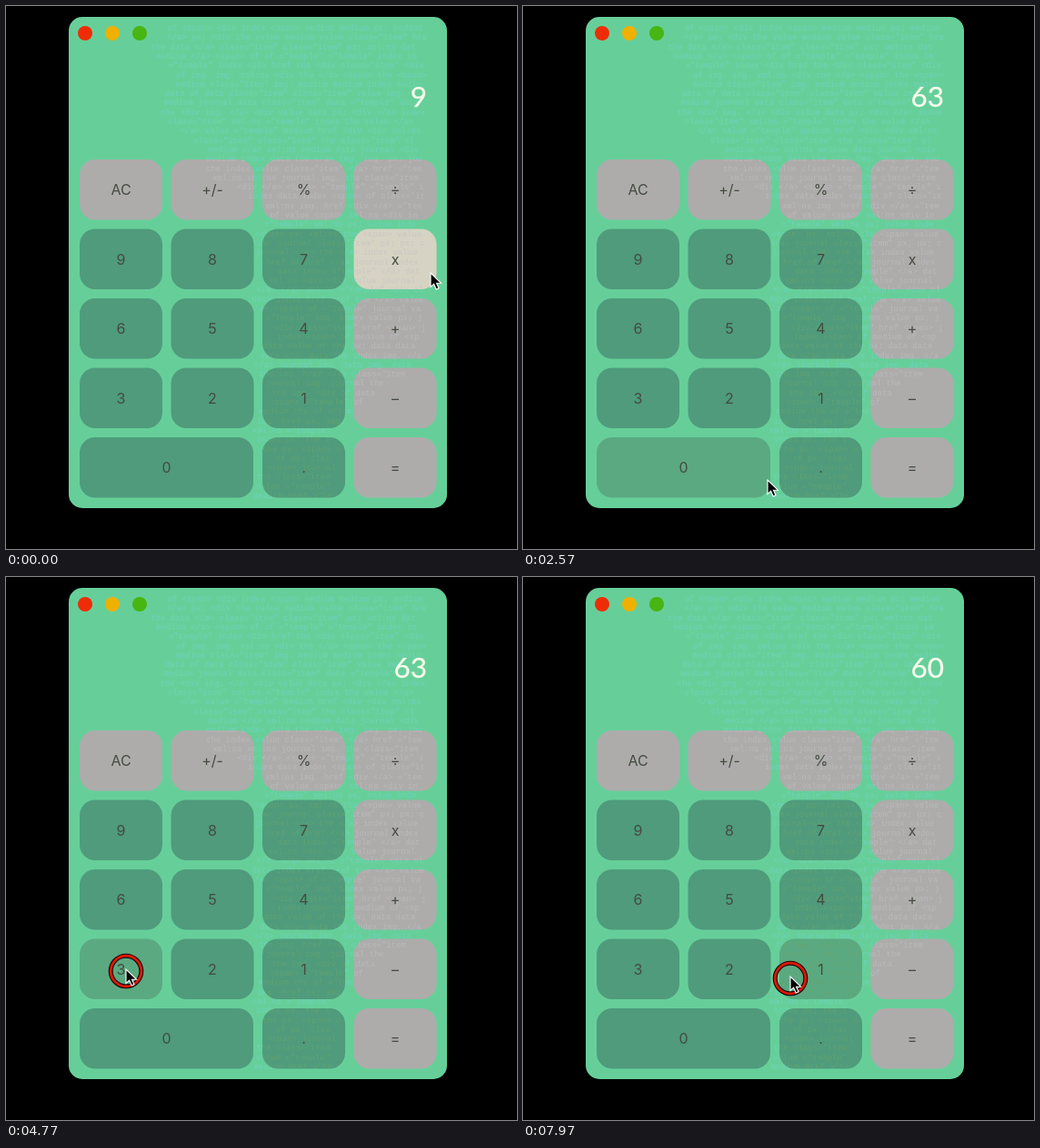
These frames come from a looping animation (562x598 px, 8 s). An HTML page:

```html
<!DOCTYPE html>
<html lang="en">
<head>
<meta charset="utf-8">
<title>Calculator</title>
<style>
  html, body { margin: 0; width: 100%; height: 100%; overflow: hidden; background: #000; }
  svg { display: block; width: 562px; height: 598px; }
  .label { font: 16px Inter, sans-serif; text-anchor: middle; fill: #444b3f; }
  .digit { fill: #4f9b7c; }
  .op { fill: #adacab; }
  .digit.hover { fill: #5ba981; }
  .op.hover { fill: #d6d3c4; }
  #display { font: 31.5px Lato, sans-serif; text-anchor: end; fill: #f8fcec; stroke: #f8fcec; stroke-width: .25; }
  #code { font: 9px "Liberation Mono", monospace; white-space: pre; }
</style>
</head>
<body>
<svg viewBox="0 0 562 598">
  <defs>
    <g id="code"></g>
    <clipPath id="opClip"></clipPath>
    <clipPath id="digitClip"></clipPath>
  </defs>
  <rect x="69" y="12" width="416" height="541" rx="15" fill="#66cf99"/>
  <use href="#code" fill="#70d3c4" opacity=".7"/>
  <circle cx="87" cy="30" r="8" fill="#ee2d08"/>
  <circle cx="117" cy="30" r="8" fill="#f0b000"/>
  <circle cx="147" cy="30" r="8" fill="#47b512"/>
  <text id="display" x="463" y="111"></text>
  <g id="keys"></g>
  <use href="#code" fill="#c2c1c4" opacity=".6" clip-path="url(#opClip)"/>
  <use href="#code" fill="#69a570" opacity=".65" clip-path="url(#digitClip)"/>
  <g id="labels"></g>
  <g id="pointer">
    <g id="ring" fill="none">
      <circle cy="2" r="16.8" stroke="#160a05" stroke-width="5"/>
      <circle cy="2" r="16.8" stroke="#df1705" stroke-width="2.8"/>
    </g>
    <path d="M0 0V15.5L3.6 12.2L6.2 18L9 16.8L6.5 11.2H11.5Z" stroke="#fff" stroke-width="1.1"/>
  </g>
</svg>
<script>
const $ = id => document.getElementById(id);
const smooth = (from, to, v) => {
  const u = Math.min(1, Math.max(0, (v - from) / (to - from)));
  return u * u * (3 - 2 * u);
};

function add(parent, tag, attrs, text = '') {
  const node = document.createElementNS('http://www.w3.org/2000/svg', tag);
  for (const name in attrs) node.setAttribute(name, attrs[name]);
  node.textContent = text;
  return parent.appendChild(node);
}

// Keypad
const keys = [];
const rows = ['AC +/- % ÷', '9 8 7 x', '6 5 4 +', '3 2 1 –', '0 _ . ='];
rows.forEach((row, r) => row.split(' ').forEach((label, c) => {
  if (label === '_') return;
  const box = {
    x: 81 + c * 100.5, y: 169 + r * 76.5,
    width: label === '0' ? 191 : 91, height: 66.5, rx: 17
  };
  const kind = r === 0 || c === 3 ? 'op' : 'digit';
  keys.push({ ...box, node: add($('keys'), 'rect', { ...box, class: kind }) });
  add($(kind + 'Clip'), 'rect', box);
  add($('labels'), 'text', { class: 'label', x: box.x + box.width / 2, y: box.y + 39 }, label);
}));

// Faint code texture, wide at the top and narrowing downwards
let seed = 17;
const random = () => (seed = seed * 16807 % 2147483647) / 2147483647;
const words = '<div class="item" value ="temple" img. journal the xml:ns medium </a> href index <span> of px; data'.split(' ');
for (let y = 27; y < 552; y += 10.3) {
  const left = 170 + 105 * smooth(105, 250, y) + 12 * Math.sin(y / 11) + random() * 12;
  const right = 465 - 95 * smooth(380, 480, y) - random() * 12;
  const count = Math.floor((right - left) / 5.4);
  let line = '';
  while (line.length < count) line += words[Math.floor(random() * words.length)] + ' ';
  add($('code'), 'text', { x: left, y }, line.slice(0, count));
}

// Pointer stops: arrival in ms, place, and the key pressed there
const stops = [
  [0, 467, 294], [300, 430, 287, 'x'], [850, 330, 287, '7'], [1530, 431, 513, '='],
  [2570, 269, 522], [3400, 428, 434, '–'], [4170, 345, 318], [4700, 132, 432, '3'],
  [5250, 445, 511, '='], [6970, 418, 276, 'x'], [7850, 294, 440, '1']
].map(([at, x, y, key]) => ({ at, x, y, key }));
const pressDelay = 60, releaseDelay = 200, rest = 220;

function pointerAt(t) {
  const i = stops.findLastIndex(stop => t >= stop.at);
  const from = stops[i], to = stops[i + 1] || from;
  const leave = from.at + (from.key ? rest : 0);
  const u = to === from ? 0 : smooth(leave, to.at, t);
  return [from.x + (to.x - from.x) * u, from.y + (to.y - from.y) * u];
}

function press(calc, key) {
  if (/\d/.test(key)) return { ...calc, shown: calc.fresh ? key : calc.shown + key, fresh: false };
  if (key !== '=') return { shown: calc.shown, stored: calc.shown, op: key, fresh: true };
  const shown = calc.op === 'x' ? calc.stored * calc.shown : calc.stored - calc.shown;
  return { shown, fresh: true };
}

const began = performance.now();
function draw() {
  const t = (performance.now() - began) % 8000;
  const [x, y] = pointerAt(t);
  const pressed = stops.filter(s => s.key && t >= s.at + pressDelay);
  const released = pressed.filter(s => t >= s.at + releaseDelay);
  $('pointer').setAttribute('transform', `translate(${x} ${y})`);
  $('ring').style.display = pressed.length > released.length ? '' : 'none';
  $('display').textContent = released.reduce((calc, s) => press(calc, s.key), { shown: '9', fresh: true }).shown;
  for (const k of keys) {
    const inside = x >= k.x && x <= k.x + k.width && y >= k.y && y <= k.y + k.height;
    k.node.classList.toggle('hover', inside);
  }
  requestAnimationFrame(draw);
}
draw();
</script>
</body>
</html>
```
